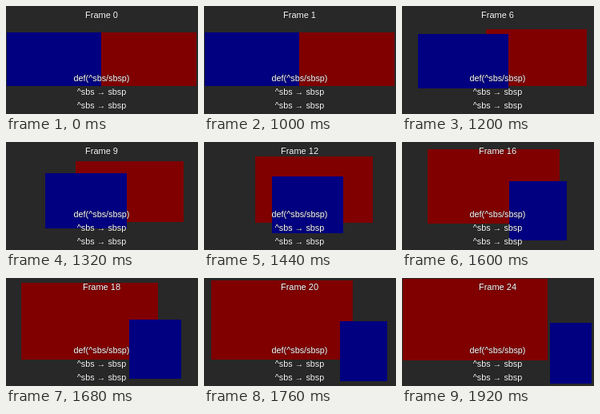
These frames come from a looping animation (240x135 px, 2.92 s). An HTML page:

```html
<!DOCTYPE html>
<html lang="en">
<head>
<meta charset="utf-8">
<title>Panel swap</title>
<style>
  html, body { margin: 0; width: 100%; height: 100%; overflow: hidden; background: #282828; }
  svg { display: block; width: 100%; height: 100%; }
  rect { shape-rendering: crispEdges; }
  text {
    font: 10.8px "Liberation Sans", Arial, sans-serif;
    text-anchor: middle;
    fill: #fff;
    stroke: #000;
    stroke-opacity: .4;
    stroke-width: 1px;
    paint-order: stroke;
  }
  #title { font-size: 11px; }
</style>
</head>
<body>
<svg viewBox="0 0 240 135">
  <rect width="240" height="135" fill="#282828"/>
  <rect id="red" fill="#800000"/>
  <rect id="blue" fill="#000080"/>
  <text id="title" x="119.5" y="15">Frame 0</text>
  <text x="119.5" y="94">def(^sbs/sbsp)</text>
  <text x="119.5" y="111">^sbs → sbsp</text>
  <text x="119.5" y="128">^sbs → sbsp</text>
</svg>
<script>
  const HOLD = 1000, STEP = 40, LAST = 24, LOOP = 2920;
  const title = document.getElementById("title");

  // Edges are left, top, right, bottom; grow widens a moving panel.
  const panels = [
    { id: "red", from: [119, 33, 238, 100], to: [1, 1, 182, 103], grow: 0 },
    { id: "blue", from: [1, 33, 119, 100], to: [185, 56, 237, 132], grow: 1 },
  ];
  for (const panel of panels) panel.node = document.getElementById(panel.id);

  function place({ node, from, to, grow }, k) {
    const extra = k > 0 && k < 1 ? grow : 0;
    const [left, top, right, bottom] = from.map((a, i) => Math.floor(a + (to[i] - a) * k + 1e-6));
    const box = { x: left - extra, y: top, width: right - left + 2 * extra, height: bottom - top };
    for (const name in box) node.setAttribute(name, box[name]);
  }

  function draw(time) {
    const step = time < HOLD ? 0 : Math.min(LAST, 1 + Math.floor((time - HOLD) / STEP));
    const progress = Math.max(0, step - 1) / (LAST - 1);
    const k = (1 - Math.cos(Math.PI * progress)) / 2;
    title.textContent = "Frame " + step;
    for (const panel of panels) place(panel, k);
  }

  const start = performance.now();
  function tick() {
    draw((performance.now() - start) % LOOP);
    requestAnimationFrame(tick);
  }
  tick();
</script>
</body>
</html>
```
